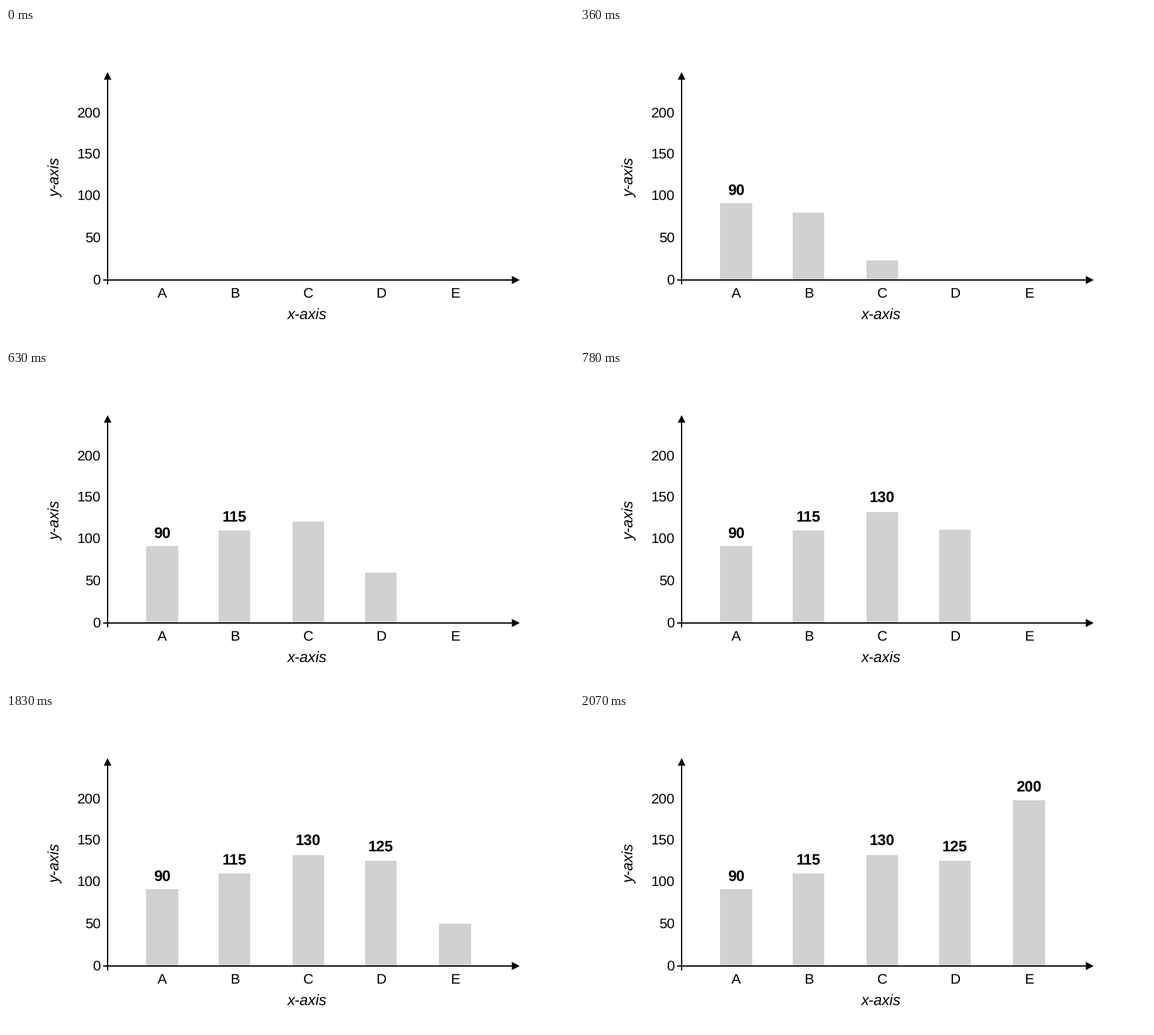
A matplotlib script for the animation above (2550 ms loop, 900x500 px).

```python
import math

import matplotlib.pyplot as plt
from matplotlib.animation import FuncAnimation
from matplotlib.patches import Polygon, Rectangle

W, H, DPI = 900, 500, 100
STEP, FRAMES = 30, 85
BASE, BAR_W = 400, 50.5
GREY = "#d1d1d3"
BIG = 2.75  # starting zoom of the last label

# name, centre x, bar top, value, label centre y, start, rise, label steps
BARS = [
    ("A", 247.5, 277.5, "90", 257.3, 0, 8.25, 3),
    ("B", 362.2, 253.2, "115", 230.8, 5, 9.6, 3),
    ("C", 478.8, 224.0, "130", 200.3, 9.86, 12.18, 3),
    ("D", 593.8, 232.6, "125", 210.8, 15, 12.48, 3),
    ("E", 711.5, 137.0, "200", 115.6, 60, 3.95, 5),
]
TICKS = [("200", 142), ("150", 207), ("100", 273), ("50", 340), ("0", 407)]

plt.rcParams["font.family"] = "Liberation Sans"
plt.rcParams["text.hinting"] = "none"

fig = plt.figure(figsize=(W / DPI, H / DPI), dpi=DPI, facecolor="white")
ax = fig.add_axes([0, 0, 1, 1])
ax.set_xlim(0, W)
ax.set_ylim(H, 0)
ax.axis("off")


def pt(px):
    return px * 72 / DPI


def write(x, y, s, px, **kw):
    opts = dict(ha="center", va="baseline", color="black", zorder=5)
    opts.update(kw)
    return ax.text(x, y, s, fontsize=pt(px), **opts)


def line(xs, ys):
    ax.plot(xs, ys, color="black", lw=pt(2), solid_capstyle="butt", zorder=3)


def arrow(points):
    ax.add_patch(Polygon(points, closed=True, fc="black", lw=0, zorder=4))


line([161, 161], [407, 80])
line([154, 804], [BASE, BASE])
arrow([(161, 70), (155, 82), (167, 82)])
arrow([(814, BASE), (801.5, BASE - 6.5), (801.5, BASE + 6.5)])

for text, y in TICKS:
    write(150, y, text, 22.5, ha="right")
write(477.3, 462, "x-axis", 24, style="italic")
write(85, 237.5, "y-axis", 24, style="italic", rotation=90,
      va="baseline", rotation_mode="anchor")

rects, labels = [], []
for name, x, top, value, ly, *_ in BARS:
    write(x, 428, name, 22.5)
    rect = Rectangle((x - BAR_W / 2, BASE), BAR_W, 0, fc=GREY, lw=0, zorder=1)
    rects.append(ax.add_patch(rect))
    labels.append(write(x, ly + 8.4, value, 24, weight="bold"))


def clamp(v):
    return max(0.0, min(1.0, v))


def draw(i):
    for bar, rect, label in zip(BARS, rects, labels):
        name, x, top, value, ly, start, rise, steps = bar
        h = (BASE - top) * clamp((i - start) / rise)
        rect.set_y(BASE - h)
        rect.set_height(h)

        full = math.ceil(start + rise)
        p = clamp((i - full) / steps)
        label.set_visible(p > 0)
        label.set_alpha(p)
        if name == "E":
            q = clamp((i - full - 1) / (steps - 1))
            zoom = BIG + (1 - BIG) * q
            label.set_fontsize(pt(24 * zoom))
            label.set_y(ly + 8.4 * zoom)
    return rects + labels


anim = FuncAnimation(fig, draw, frames=FRAMES, interval=STEP,
                     init_func=lambda: draw(0), repeat=True, repeat_delay=0)
plt.show()
```
